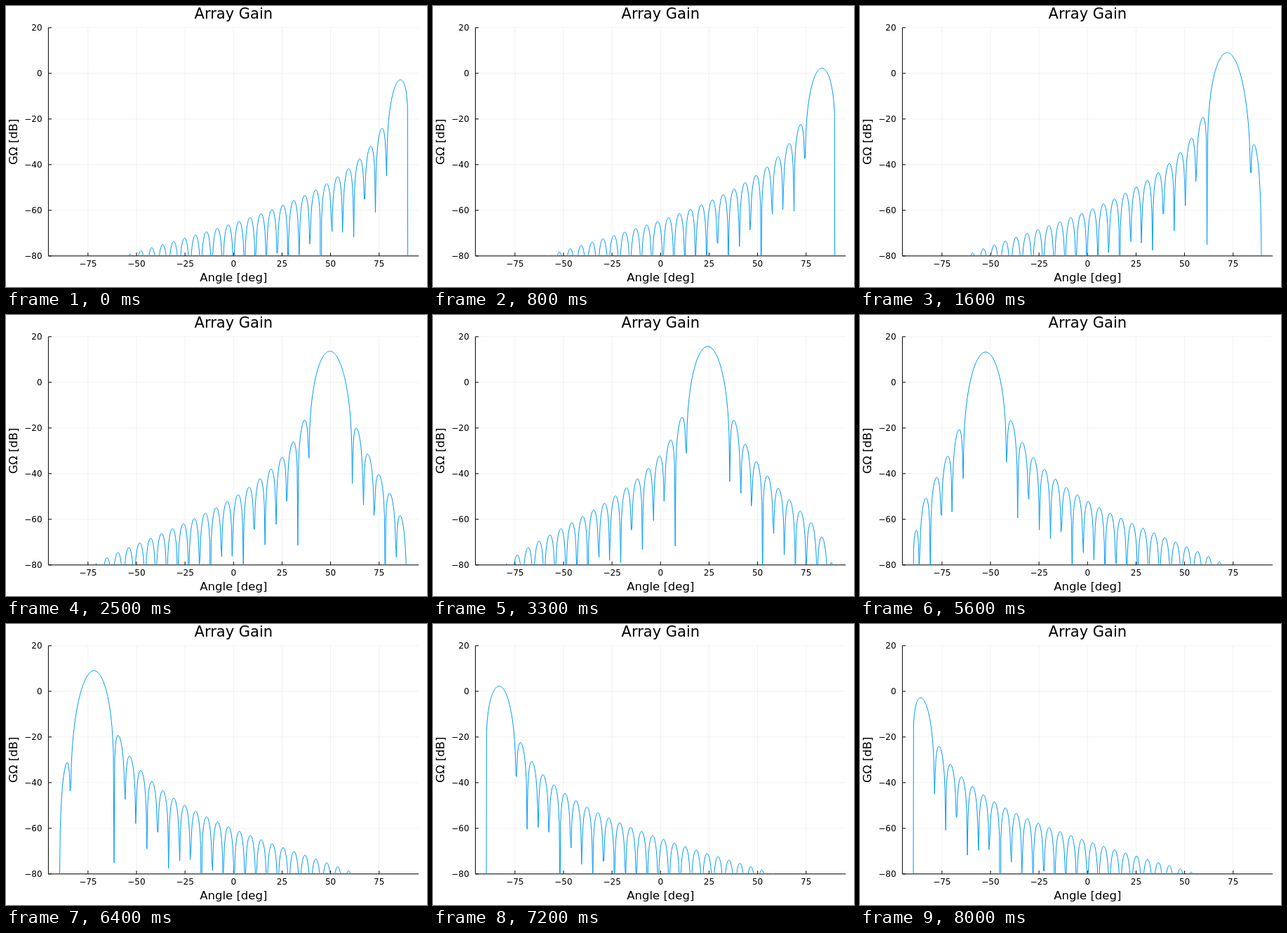
Write an HTML page that moves like this. It is 600x400 px and loops after 8100 ms.

```html
<!DOCTYPE html>
<html lang="en">
<head>
<meta charset="utf-8">
<title>Array Gain</title>
<style>
  html, body { margin: 0; width: 100%; height: 100%; overflow: hidden; background: #fff; }
  svg { display: block; width: 600px; height: 400px; font: 12px "DejaVu Sans", sans-serif; }
  text { text-anchor: middle; }
  .ytick { text-anchor: end; }
  .label { font-size: 16.5px; }
  .title { font-size: 21px; }
  path { fill: none; stroke: #000; }
  #grid { stroke-opacity: .06; }
  #curve { stroke: #009af9; stroke-linejoin: round; }
</style>
</head>
<body>
<svg viewBox="0 0 600 400">
  <clipPath id="area"><rect x="60.4" y="30.87" width="527.79" height="324.93"/></clipPath>
  <path id="grid"/>
  <path id="axes"/>
  <g id="ticks"></g>
  <text class="title" x="324.3" y="18.1">Array Gain</text>
  <text class="label" x="324.3" y="392">Angle [deg]</text>
  <text class="label" transform="translate(16 193.3) rotate(-90)">GΩ [dB]</text>
  <path id="curve" clip-path="url(#area)"/>
</svg>
<script>
const LEFT = 60.4, RIGHT = 588.19, TOP = 30.87, BOTTOM = 355.8;
const HALF = 32, STEPS = 500, FRAMES = 81, FRAME_MS = 100, RAD = Math.PI / 180;
const $ = id => document.getElementById(id);
const px = deg => LEFT + (deg + 95.4) / 190.8 * (RIGHT - LEFT);
const py = db => BOTTOM - (db + 80) / 100 * (BOTTOM - TOP);

function drawAxes() {
  let grid = "", axes = `M${LEFT} ${TOP}V${BOTTOM}H${RIGHT}`, labels = "";
  const name = v => String(v).replace("-", "−");
  for (let v = -75; v <= 75; v += 25) {
    const x = px(v);
    grid += `M${x} ${TOP}V${BOTTOM}`;
    axes += `M${x} ${BOTTOM}v-4.7`;
    labels += `<text x="${x}" y="371.4">${name(v)}</text>`;
  }
  for (let v = -80; v <= 20; v += 20) {
    const y = py(v);
    grid += `M${LEFT} ${y}H${RIGHT}`;
    axes += `M${LEFT} ${y}h4.7`;
    labels += `<text class="ytick" x="51.6" y="${y + 4.3}">${name(v)}</text>`;
  }
  $("grid").setAttribute("d", grid);
  $("axes").setAttribute("d", axes);
  $("ticks").innerHTML = labels;
}

// Hann taper over 64 elements, listed from the centre outwards
const taper = Array.from({ length: HALF }, (_, n) => Math.cos(Math.PI * (n + .5) / (2 * HALF)) ** 2);
const noise = 2 * taper.reduce((sum, w) => sum + w * w, 0);

// Array gain in dB with a cos^1.4 element pattern
function gain(deg, steer) {
  const d = (deg - steer) * RAD;
  const field = 2 * taper.reduce((sum, w, n) => sum + w * Math.cos((n + .5) * d), 0);
  const power = field * field / noise * Math.abs(Math.cos(deg * RAD)) ** 1.4;
  return Math.max(10 * Math.log10(power), -300);
}

function drawCurve(frame) {
  const steer = 90 * Math.cos(Math.PI * frame / (FRAMES - 1));
  const points = [];
  for (let i = 0; i <= STEPS; i++) {
    const deg = -90 + 180 * i / STEPS;
    points.push(px(deg).toFixed(2) + " " + py(gain(deg, steer)).toFixed(2));
  }
  $("curve").setAttribute("d", "M" + points.join("L"));
}

let shown = -1;
const start = performance.now();
function tick() {
  const frame = Math.floor((performance.now() - start) / FRAME_MS) % FRAMES;
  if (frame !== shown) drawCurve(shown = frame);
  requestAnimationFrame(tick);
}
drawAxes();
tick();
</script>
</body>
</html>
```
